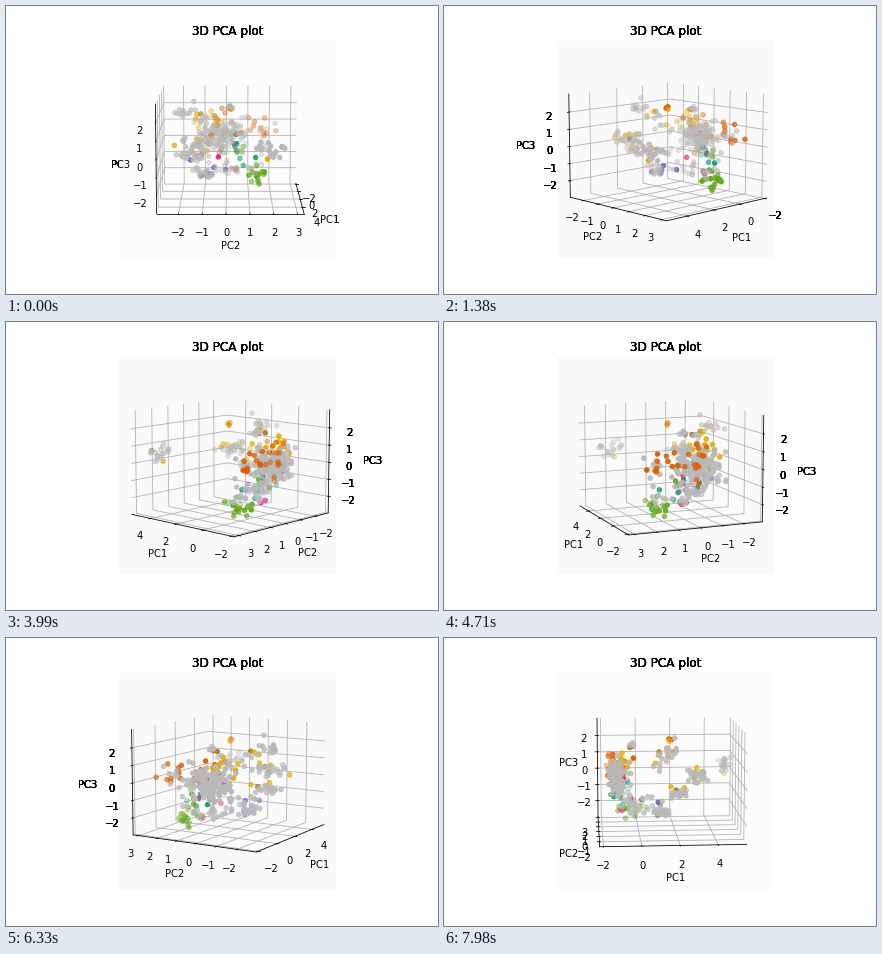
A matplotlib script that plays this animation: 432 by 288 pixels, repeating every 8000 ms.

```python
import numpy as np
import matplotlib.pyplot as plt
from matplotlib.animation import FuncAnimation

LOOP_MS, FRAMES = 8000, 320
STEP = LOOP_MS // FRAMES
MS_PER_DEGREE = 30
LIMITS = np.array([(-2.19, 5.49), (-2.92, 3.28), (-2.98, 3.04)])

GREY, ORANGE, GOLD, BROWN = "#b9b9b9", "#d95f02", "#e6ab02", "#a6761d"
GREEN, TEAL, PINK, PURPLE = "#66a61e", "#1b9e77", "#e7298a", "#7570b3"

# Clusters: centre and spread in PC1, PC2, PC3
CLUSTERS = {
    "core": ((-1.25, -0.2, 0.15), (0.2, 0.5, 0.55)),
    "halo": ((-1.05, 0.4, 0.35), (0.3, 0.95, 0.6)),
    "outer": ((4.95, 1.95, 0.45), (0.15, 0.33, 0.26)),
    "arm": ((3.2, -1.25, 0.4), (0.3, 0.5, 0.2)),
    "bend": ((2.1, -1.65, -0.5), (0.3, 0.4, 0.18)),
    "bridge": ((0.3, -1.4, -0.75), (0.7, 0.35, 0.15)),
    "upper": ((1.4, -1.5, 1.8), (0.25, 0.4, 0.2)),
    "cap": ((-0.3, 0.2, 2.0), (0.12, 0.2, 0.1)),
    "middle": ((1.1, -0.6, 1.0), (0.2, 0.3, 0.12)),
    "lower": ((0.9, -0.8, -1.62), (0.35, 0.45, 0.16)),
    "base": ((-0.3, 0.4, -1.65), (0.32, 0.65, 0.22)),
    "peak": ((1.8, 0.2, 2.22), (0.06, 0.05, 0.05)),
    "tip": ((1.85, -1.42, 2.65), (0, 0, 0)),
    "crest": ((-1.3, 0.9, 0.7), (0.2, 0.7, 0.4)),
    "shoulder": ((-1.0, -0.6, 1.0), (0.35, 0.4, 0.35)),
    "foot": ((-0.3, 1.4, -2.02), (0.4, 0.25, 0.27)),
    "flank": ((-1.0, 0.5, -0.8), (0.3, 0.55, 0.55)),
}

COUNTS = {
    GREY: dict(core=90, halo=40, outer=18, arm=21, bend=17, bridge=9,
               upper=14, cap=5, middle=5, lower=18, base=17, tip=1),
    ORANGE: dict(crest=18, peak=2, shoulder=5, core=4),
    GOLD: dict(shoulder=11, arm=4, bend=3, upper=3, peak=1, outer=1, middle=1),
    BROWN: dict(cap=2, arm=2, upper=1, bend=1, outer=1, core=2),
    GREEN: dict(foot=17, flank=4, core=2),
    TEAL: dict(flank=10),
    PINK: dict(flank=5, core=4),
    PURPLE: dict(lower=6, bridge=2, core=3),
}

rng = np.random.default_rng(11)


def cloud(counts):
    parts = []
    for name, n in counts.items():
        centre, spread = map(np.array, CLUSTERS[name])
        parts.append(centre + spread * rng.normal(size=(n, 3)).clip(-2, 2))
    return np.clip(np.vstack(parts), LIMITS[:, 0] + 0.14, LIMITS[:, 1] - 0.14).T


def make_axes():
    ax = fig.add_subplot(projection="3d")
    ax.set(xlabel="PC1", ylabel="PC2", zlabel="PC3")
    ax.set_xlim(LIMITS[0])
    ax.set_ylim(LIMITS[1])
    ax.set_zlim(LIMITS[2])
    ax.set_xticks(range(-2, 5, 2))
    ax.set_yticks(range(-2, 4))
    ax.set_zticks(range(-2, 3))
    for axis in (ax.xaxis, ax.yaxis, ax.zaxis):
        axis.set_pane_color((1, 1, 1, 0))
    return ax


def harden(text, passes=5):
    """Draw a text repeatedly so that its soft edges turn solid."""
    draw = text.draw

    def draw_solid(renderer):
        for _ in range(passes):
            draw(renderer)

    text.draw = draw_solid


fig = plt.figure(figsize=(6, 4), dpi=72, facecolor="white")
fig.subplots_adjust(left=0.125, right=0.9, bottom=0.125, top=0.88)

# Lettering outside the plot square is hard-edged: the rear copy supplies it
rear, front = make_axes(), make_axes()
rear.grid(False)
harden(rear.set_title("3D PCA plot", y=1 / 0.92))  # 3D axes scale y by 0.92
for axis in (rear.xaxis, rear.yaxis, rear.zaxis):
    harden(axis.label)
    for tick in axis.get_major_ticks():
        harden(tick.label1)

for color, counts in COUNTS.items():
    front.scatter(*cloud(counts), s=20, c=color)


def update(i):
    azim = int((i * STEP + MS_PER_DEGREE / 2) / MS_PER_DEGREE) + 1e-6
    shade = 0.988 - 0.008 * abs(np.sin(np.radians(2 * azim)))
    front.set_facecolor((shade,) * 3)
    for ax in (rear, front):
        ax.view_init(elev=10, azim=azim)
    return rear, front


anim = FuncAnimation(fig, update, frames=FRAMES, interval=STEP,
                     repeat=True, repeat_delay=0, blit=False)
plt.show()
```
